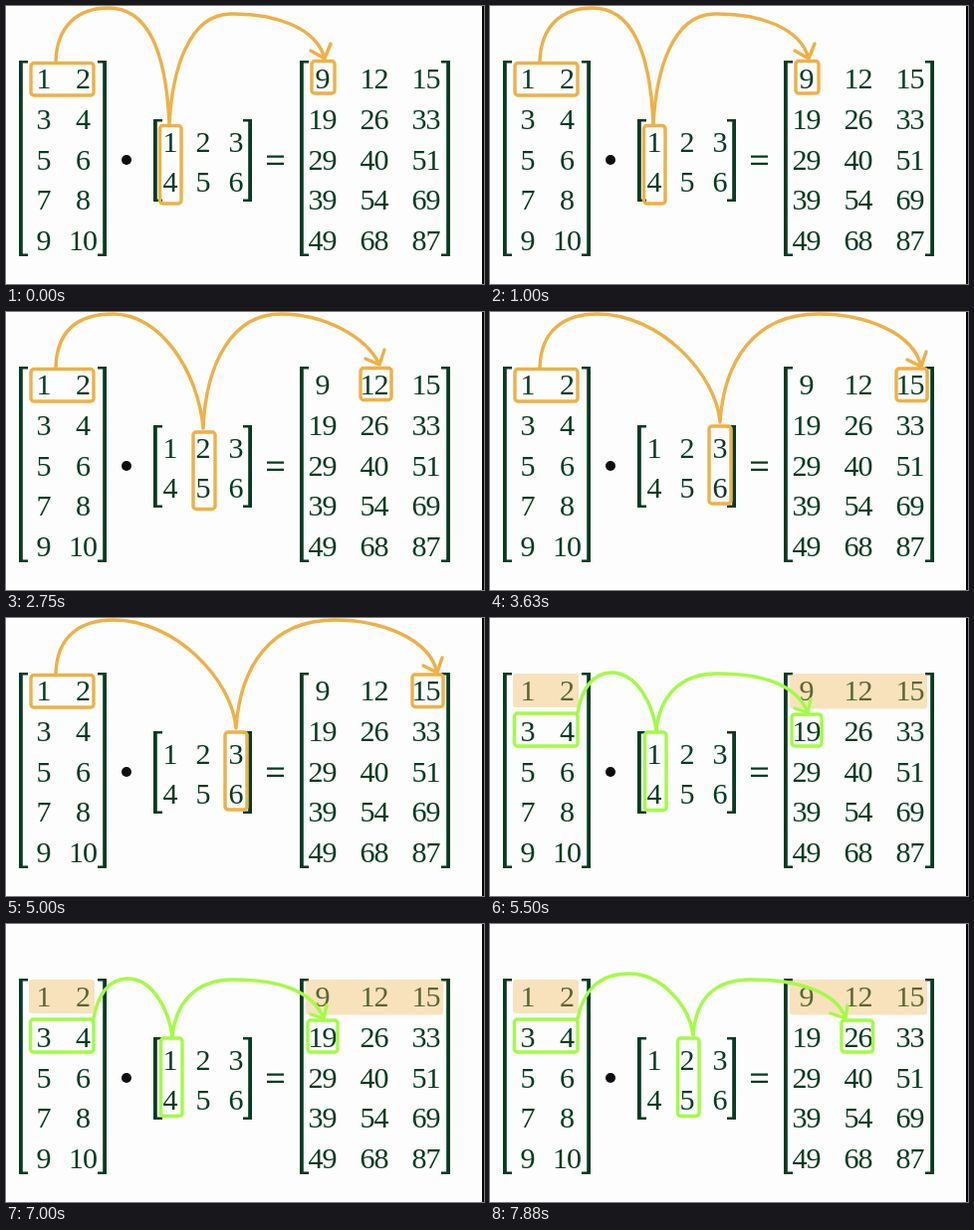
These frames come from a looping animation (480 by 280 pixels, 8 s). An HTML page:

```html
<!DOCTYPE html>
<html lang="en">
<head>
<meta charset="utf-8">
<title>Matrix multiplication</title>
<style>
  html, body { margin: 0; width: 100%; height: 100%; overflow: hidden; background: #fcfdfc; }
  svg { display: block; }
  text { font: 30px "Liberation Serif", "Times New Roman", serif; letter-spacing: -1.2px; text-anchor: middle; fill: #053b22; }
  .ink { fill: #053b22; }
  .mark { fill: none; stroke-width: 3.4; stroke-linecap: round; stroke-linejoin: round; }
  .done { fill: #efb24c; opacity: .36; }
</style>
</head>
<body>
<svg width="480" height="280" viewBox="0 0 480 280">
  <g id="matrices"></g>
  <circle cx="121" cy="155" r="5" fill="#0b0d10"/>
  <path class="ink" d="M262 150.5h17v2.3h-17zM262 157.8h17v2.3h-17z"/>
  <path d="M478 0h2v280h-2z" fill="#050505"/>
  <g id="steps"></g>
</svg>
<script>
const matrices = [
  { rows: [[1, 2], [3, 4], [5, 6], [7, 8], [9, 10]],
    columns: [38, 77.5], baseline: 83, left: 13, right: 101, top: 55, bottom: 252 },
  { rows: [[1, 2, 3], [4, 5, 6]],
    columns: [165, 198, 231], baseline: 146.5, left: 148, right: 247, top: 114, bottom: 197 },
  { rows: [[9, 12, 15], [19, 26, 33], [29, 40, 51], [39, 54, 69], [49, 68, 87]],
    columns: [318, 370, 422], baseline: 83, left: 295, right: 446, top: 55, bottom: 252 },
];

const bracket = (x, dir, top, bottom) =>
  `<path class="ink" d="M${x} ${top}h${9 * dir}v2.6h${-5.2 * dir}V${bottom - 2.6}h${5.2 * dir}v2.6h${-9 * dir}z"/>`;

document.getElementById('matrices').innerHTML = matrices.map(m =>
  bracket(m.left, 1, m.top, m.bottom) + bracket(m.right, -1, m.top, m.bottom) +
  m.rows.map((row, r) => row.map((n, c) =>
    `<text x="${m.columns[c] - .6}" y="${m.baseline + 40.8 * r}">${n}</text>`).join('')).join('')
).join('');

const box = (x, y, w, h, cls = '') =>
  `<rect class="${cls}" x="${x}" y="${y}" width="${w}" height="${h}" rx="3"/>`;
const orange = '#efb046', green = '#a2fb45';
const firstRow = box(25, 57.5, 63, 32.5);
const secondRow = box(24.5, 96, 63.5, 33);
const finished = box(23, 56, 66, 34, 'done') + box(301, 56, 138, 35.5, 'done');

// Each step: colour, boxes, arcs with arrowhead
const steps = [
  [orange, firstRow + box(154.5, 120.5, 21.5, 78.5) + box(307, 55.5, 23, 32.5),
    'M50 56C51 20 72 2 103 2C145 2 161 50 164 119C167 65 183 9 225 8C270 7 312 22 320 53M306 45L320 53L326 38'],
  [orange, firstRow + box(188, 121, 22, 77.5) + box(356, 56.5, 31, 32),
    'M50 56C51 18 72 2 108 2C155 2 193 60 198 117C201 50 228 2 276 2C320 2 362 25 375 53M361 47L375 53L380 38'],
  [orange, firstRow + box(220, 115, 22, 78) + box(408, 57, 31, 32.5),
    'M50 56C51 18 75 2 108 2C170 2 227 62 231 111C235 50 265 2 330 2C375 2 425 20 433 55M419 48L433 55L438 40'],
  [green, secondRow + box(155.5, 115, 21.5, 78.5) + box(303, 97, 30, 32),
    'M88 95C92 72 103 55 122 55C148 55 164 88 167 114C170 80 190 56 228 56C275 56 308 68 319 95M306 91L319 95L322 82'],
  [green, secondRow + box(188.5, 115, 21.5, 78.5) + box(353, 97, 31.5, 32),
    'M88 95C94 68 108 50 140 50C172 50 200 82 204 112C207 72 228 56 262 56C308 56 348 68 357 95M342 90L357 95L359 82'],
];

const stepsGroup = document.getElementById('steps');
stepsGroup.innerHTML = steps.map(([color, boxes, arcs]) =>
  `<g visibility="hidden">${color === green ? finished : ''}
    <g class="mark" stroke="${color}">${boxes}<path d="${arcs}"/></g></g>`).join('');

const groups = [...stepsGroup.children];
function draw(now) {
  const t = now % 8000;
  const current = Math.floor((t + 500) / 2000);
  groups.forEach((g, i) => g.setAttribute('visibility', i === current ? 'visible' : 'hidden'));
  requestAnimationFrame(draw);
}
draw(performance.now());
</script>
</body>
</html>
```
